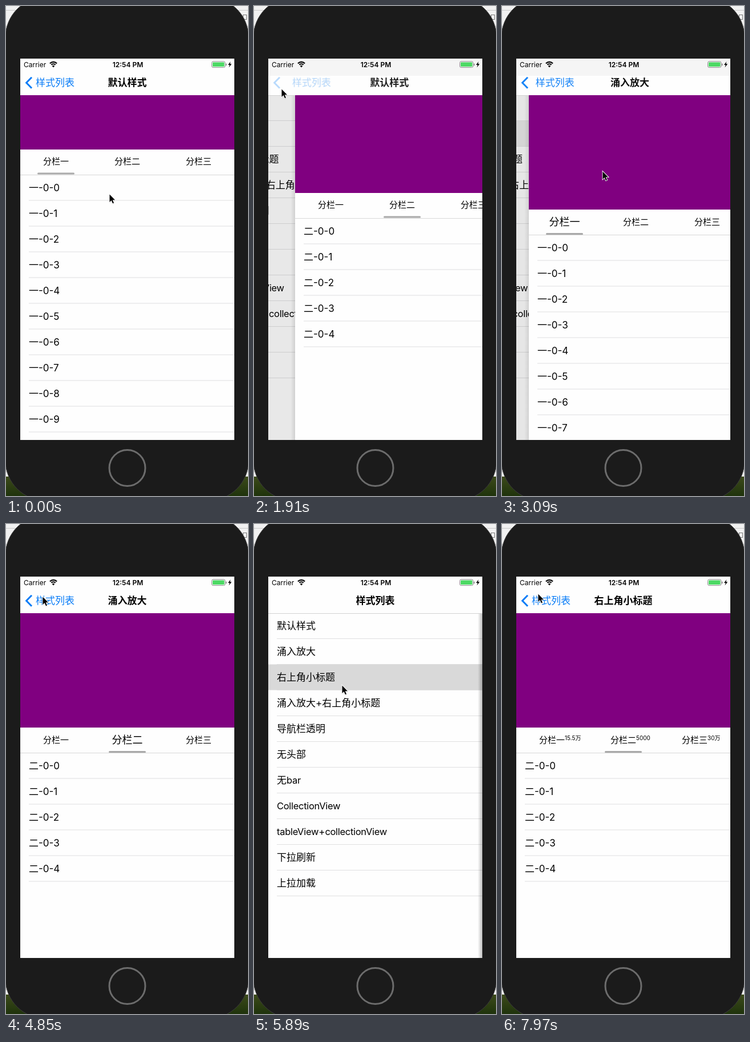
An HTML page with a canvas for the animation above (8 s loop, 424 by 857 pixels).

```html
<!DOCTYPE html>
<html lang="zh-CN">
<head>
<meta charset="utf-8">
<title>样式列表</title>
<style>
  html, body { margin: 0; width: 100%; height: 100%; overflow: hidden; background: #1b1b1b; }
  canvas { display: block; width: 424px; height: 857px; }
</style>
</head>
<body>
<canvas id="stage" width="424" height="857"></canvas>
<script>
const ctx = document.getElementById('stage').getContext('2d');
const LOOP = 8000, STEP = 147.5;
const FONT = 'Inter, "Noto Sans CJK SC", "Noto Sans CJK JP", "Noto Sans CJK", sans-serif';
const BLUE = '#087cf7', WHITE = '#fefefe', RULE = '#e0e0e1';
const LEFT = 25, TOP = 92, RIGHT = 400, BOTTOM = 759, NAV = 156, WIDTH = RIGHT - LEFT, ROW = 45;

const MENU = ['默认样式', '涌入放大', '右上角小标题', '涌入放大+右上角小标题', '导航栏透明', '无头部',
  '无bar', 'CollectionView', 'tableView+collectionView', '下拉刷新', '上拉加载'];
const TABS = ['分栏一', '分栏二', '分栏三'];
const BADGES = ['15.5万', '5000', '30万'];

// Moments are counted in display steps.
const VISITS = [
  { row: 0, push: -99, tap: 5.5, pop: 12.77 },
  { row: 1, push: 19.286, tap: 26, pop: 33.3, grow: true },
  { row: 2, push: 40, tap: 47.35, pop: 99, badges: true }
];
const POINTER = [
  [0, 181, 329], [3, 184, 405], [5, 212, 352], [7, 212, 350], [11, 62, 137], [13, 48, 145],
  [15, 62, 168], [18, 148, 228], [19, 154, 236], [21, 176, 289], [24, 211, 372], [27, 212, 374],
  [31, 72, 133], [33, 64, 127], [34, 64, 128], [37, 112, 220], [39, 152, 276], [40, 154, 282],
  [42, 190, 318], [45, 261, 371], [49, 258, 372], [53, 70, 128], [54, 63, 122]
];

const clamp = v => Math.max(0, Math.min(1, v));
const mix = (a, b, p) => a + (b - a) * p;
const smooth = p => (1 - Math.cos(Math.PI * clamp(p))) / 2;
const spring = steps => {
  const x = Math.max(0, steps) * STEP / 1000 * 18;
  return (1 + x) * Math.exp(-x);
};

function rect(x, y, w, h, color) {
  ctx.fillStyle = color;
  ctx.fillRect(x, y, w, h);
}

function rounded(x, y, w, h, r, color) {
  ctx.beginPath();
  ctx.roundRect(x, y, w, h, r);
  ctx.fillStyle = color;
  ctx.fill();
}

function polygon(points, color) {
  ctx.beginPath();
  points.forEach(([x, y]) => ctx.lineTo(x, y));
  ctx.closePath();
  ctx.fillStyle = color;
  ctx.fill();
}

function clipped(x, y, w, h, draw) {
  ctx.save();
  ctx.beginPath();
  ctx.rect(x, y, w, h);
  ctx.clip();
  draw();
  ctx.restore();
}

function text(str, x, y, size, { color = '#000', weight = 400, align = 'left', alpha = 1 } = {}) {
  ctx.font = `${weight} ${size}px ${FONT}`;
  ctx.textAlign = align;
  ctx.fillStyle = color;
  ctx.globalAlpha = alpha;
  ctx.fillText(str, x, y);
  ctx.globalAlpha = 1;
}

// Latin words run slightly tighter than the CJK text around them.
function rowText(str, x, y) {
  for (const run of str.match(/[a-z]+|[^a-z]+/gi)) {
    const latin = /[a-z]/i.test(run);
    ctx.letterSpacing = latin ? '-0.3px' : '0px';
    text(run, x, y, latin ? 16.5 : 17);
    x += ctx.measureText(run).width;
  }
  ctx.letterSpacing = '0px';
}

function drawDevice() {
  rect(0, 0, 424, 823, '#f1f1f1');
  rect(0, 7, 424, 1, '#c9c9c9');
  ctx.strokeStyle = '#777';
  ctx.lineWidth = 1;
  ctx.strokeRect(415.5, 15.5, 6, 8);
  const grass = ctx.createLinearGradient(0, 823, 0, 857);
  grass.addColorStop(0, '#3c4a1a');
  grass.addColorStop(1, '#1f330c');
  rect(0, 823, 424, 34, grass);
  rounded(-1, -15, 426, 880, 70, '#1b1b1b');
  ctx.strokeStyle = '#3c3c3c';
  ctx.stroke();
  ctx.beginPath();
  ctx.arc(212.5, 808, 31.5, 0, Math.PI * 2);
  ctx.lineWidth = 3;
  ctx.strokeStyle = '#6c6c6c';
  ctx.stroke();
}

function drawStatus() {
  text('Carrier', 31, 106.5, 12);
  text('12:54 PM', 213.5, 106.5, 12, { weight: 600, align: 'center' });
  ctx.strokeStyle = '#000';
  ctx.lineWidth = 2.2;
  for (const r of [5.2, 8.6]) {
    ctx.beginPath();
    ctx.arc(83, 106.5, r, -Math.PI * 0.75, -Math.PI * 0.25);
    ctx.stroke();
  }
  polygon([[83, 107.5], [80.6, 104.8], [83, 103.8], [85.4, 104.8]], '#000');
  ctx.beginPath();
  ctx.roundRect(360.5, 97, 23.5, 10.5, 2.5);
  ctx.lineWidth = 1;
  ctx.strokeStyle = '#8a8a8a';
  ctx.stroke();
  rounded(362, 98.5, 20.5, 7.5, 1, '#4cd964');
  rounded(385, 100.5, 1.5, 4, 1, '#8a8a8a');
  polygon([[393.5, 97], [389, 103], [391.8, 103], [390.5, 107.5], [395.3, 101.2], [392.4, 101.2]], '#000');
}

function drawNav(title, out, pressed) {
  rect(LEFT, TOP, WIDTH, NAV - TOP, WHITE);
  if (out > 0.01 && out < 0.99) rect(LEFT, TOP, WIDTH, 30, 'rgba(0,0,0,.035)');
  drawStatus();
  const bold = { weight: 600, align: 'center' };
  if (out < 1) {
    const alpha = (1 - out) * (pressed ? 0.32 : 1);
    text(title, 212.5 + 197 * out, 140, 17, { ...bold, alpha: 1 - out });
    text('样式列表', 52 + 117 * out, 140, 17, { color: BLUE, alpha });
    ctx.globalAlpha = alpha;
    ctx.beginPath();
    ctx.moveTo(45, 124.8);
    ctx.lineTo(35.7, 134.3);
    ctx.lineTo(45, 143.8);
    ctx.lineWidth = 3;
    ctx.strokeStyle = BLUE;
    ctx.stroke();
    ctx.globalAlpha = 1;
  }
  text('样式列表', 212.5 - 126 * (1 - out), 140, 17, { ...bold, alpha: out * out });
}

function drawMenu(out, selected) {
  const x = LEFT - 0.3 * WIDTH * (1 - out);
  rect(LEFT, NAV, WIDTH, BOTTOM - NAV, WHITE);
  MENU.forEach((label, i) => {
    const y = NAV + i * ROW;
    if (i === selected) {
      const shade = Math.round(mix(236, 217, out));
      rect(LEFT, y - 0.5, WIDTH, ROW, `rgb(${shade},${shade},${shade})`);
    }
    rowText(label, x + 15, y + 28);
    rect(x + 15, y + 44, WIDTH * 1.3, 1, RULE);
  });
  rect(LEFT, NAV, WIDTH, 1, '#d2d2d2');
  rect(LEFT, NAV, WIDTH, BOTTOM - NAV, `rgba(0,0,0,${0.1 * (1 - out)})`);
}

function drawTable(prefix, count, x, y) {
  for (let i = 0; i < count; i++) {
    rowText(`${prefix}-0-${i}`, x + 15, y + i * ROW + 28.5);
    rect(x + 15, y + i * ROW + 44.5, WIDTH - 15, 1, RULE);
  }
}

function drawPage(visit, k, out) {
  const x = LEFT + WIDTH * out;
  const shadow = ctx.createLinearGradient(x - 8, 0, x, 0);
  shadow.addColorStop(0, 'rgba(0,0,0,0)');
  shadow.addColorStop(1, `rgba(0,0,0,${0.08 + 0.17 * out})`);
  rect(x - 8, NAV, 8, BOTTOM - NAV, shadow);
  rect(x, NAV, WIDTH, BOTTOM - NAV, WHITE);

  const header = visit.row ? 200 : mix(94.5, 170.5, smooth((k + 1) / 4) * 1.172 - 0.172);
  const bar = NAV + (visit.row ? header : k === 0 ? 94.5 : header);
  const shift = smooth((k - visit.tap) / 2.05);
  rect(x, NAV, WIDTH, Math.round(bar) - NAV, '#800080');

  const tableTop = Math.round(bar + 44);
  clipped(x, tableTop, WIDTH, BOTTOM - tableTop, () => {
    if (shift < 1) drawTable('一', 20, x - WIDTH * shift, tableTop);
    if (shift > 0) drawTable('二', 5, x + WIDTH * (1 - shift), tableTop);
  });
  rect(x, tableTop, WIDTH, 1, '#d8d8d8');

  TABS.forEach((label, i) => {
    const center = x + 62.5 + 125 * i;
    const focus = visit.grow ? clamp(1 - Math.abs(i - shift)) : 0;
    const size = 15 + 3 * focus;
    text(label, center, bar + 21.3 + size * 0.37, size, { align: 'center' });
    if (visit.badges) text(BADGES[i], center + 22.5, bar + 22, 10);
  });
  rounded(x + 30 + 125 * shift, bar + 41, 65, 3, 1.5, '#a9a9a9');
}

function drawPointer(k) {
  const next = Math.max(1, POINTER.findIndex(p => p[0] >= k));
  const [a, ax, ay] = POINTER[next - 1], [b, bx, by] = POINTER[next];
  const p = (k - a) / (b - a);
  ctx.save();
  ctx.translate(mix(ax, bx, p), mix(ay, by, p));
  ctx.shadowColor = 'rgba(0,0,0,.35)';
  ctx.shadowBlur = 2;
  ctx.shadowOffsetY = 1;
  const arrow = [[0.5, 0.5], [0.5, 14], [3.6, 11], [6, 16.3], [8, 15.4], [5.7, 10.2], [10, 10.2]];
  polygon(arrow, '#000');
  ctx.shadowColor = 'transparent';
  ctx.lineWidth = 1.8;
  ctx.strokeStyle = '#fff';
  ctx.stroke();
  polygon(arrow, '#000');
  ctx.restore();
}

function render(time) {
  const k = Math.min(54, Math.floor((time % LOOP) / STEP + 0.13));
  const visit = VISITS.filter(v => v.push <= k).pop();
  const popping = k >= visit.pop;
  let out = popping ? 1 - spring(k - visit.pop) : spring(k - visit.push);
  if (out < 0.002) out = 0;
  if (out > 0.996) out = 1;
  const gone = popping && out === 1;
  const touched = VISITS.find(v => k >= v.push - 0.6 && k < v.push + 4);

  drawDevice();
  clipped(LEFT, TOP, WIDTH, BOTTOM - TOP, () => {
    if (out > 0) drawMenu(out, touched ? touched.row : -1);
    if (!gone) drawPage(visit, k, out);
    drawNav(MENU[visit.row], out, popping);
    if (out > 0) rect(LEFT, NAV, WIDTH * out, 1, '#d2d2d2');
  });
  drawPointer(k);
}

const start = performance.now();
function tick() {
  render(performance.now() - start);
  requestAnimationFrame(tick);
}
tick();
</script>
</body>
</html>
```
